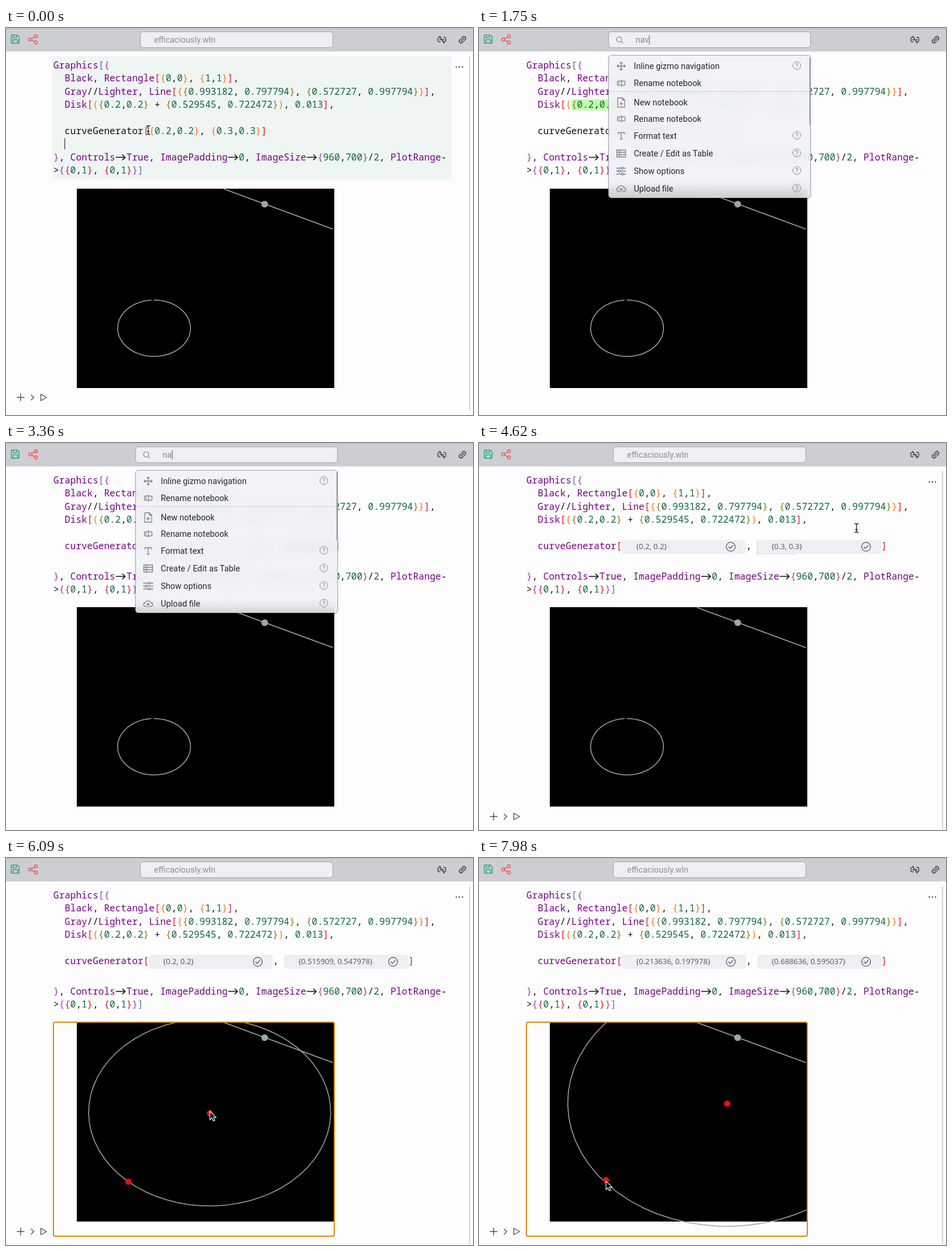
An HTML page that plays this animation: 798x660 px, repeating every 8000 ms.

```html
<!DOCTYPE html>
<html lang="en">
<head>
<meta charset="utf-8">
<title>Notebook curve editor</title>
<style>
html, body { margin: 0; width: 100%; height: 100%; overflow: hidden; background: #fdfdfd; }
svg { position: absolute; left: 0; top: 0; display: block; }
text { white-space: pre; }
.code { font: 16px "Noto Sans Mono", "DejaVu Sans Mono", monospace; }
.ui { font: 14.3px Roboto, "Liberation Sans", sans-serif; }
.field { font: 13px "Open Sans", "Noto Sans", sans-serif; fill: #55565c; }
.line { fill: none; stroke-linecap: round; stroke-linejoin: round; }
#menu {
  position: absolute; left: 221px; top: 46px; width: 344px; height: 242px;
  border: 1px solid #a3a5ad; border-radius: 5px; overflow: hidden;
  background: rgba(240, 241, 246, .86);
  -webkit-backdrop-filter: blur(9px); backdrop-filter: blur(9px);
  box-shadow: 0 1px 3px rgba(0, 0, 0, .18);
}
</style>
</head>
<body>
<svg id="stage" width="798" height="660" viewBox="0 0 798 660"></svg>
<div id="menu"><svg id="items" width="344" height="242" viewBox="222 47 344 242"></svg></div>
<script>
const LOOP = 8000, STEP = 70;
const CELL = 9.6, LEFT = 81, FIELD_W = 212;
const W = 440, H = 340;
const OPEN = [940, 2940], INSERT = [1820, 3500], CLOSE = [1820, 3710];
const GRAB = 5390, DROP = 7000, REGRAB = 7560;
const BRACKETS = ['#5f6f8a', '#a03cb4', '#d8173f', '#f57a0a', '#8a7a10'];

const stage = document.getElementById('stage');
const items = document.getElementById('items');
const menu = document.getElementById('menu');

function add(parent, tag, attrs = {}, text) {
  const el = document.createElementNS('http://www.w3.org/2000/svg', tag);
  for (const k in attrs) el.setAttribute(k, attrs[k]);
  if (text !== undefined) el.textContent = text;
  parent.appendChild(el);
  return el;
}
const group = (parent, x = 0, y = 0) => add(parent, 'g', { transform: `translate(${x} ${y})` });
const move = (el, x, y) => el.setAttribute('transform', `translate(${x} ${y})`);
const show = (el, on) => { el.style.display = on ? '' : 'none'; };
const box = (parent, x, y, width, height, fill, more) =>
  add(parent, 'rect', { x, y, width, height, fill, ...more });
const stroke = (parent, d, color, width = 1.4) =>
  add(parent, 'path', { d, class: 'line', stroke: color, 'stroke-width': width });
const ring = (cx, cy, r) => `M${cx - r} ${cy}a${r} ${r} 0 1 0 ${2 * r} 0a${r} ${r} 0 1 0 ${-2 * r} 0`;

// Header
box(stage, 0, 0, 798, 40, '#cdced3');
box(stage, 0, 0, 798, 1, '#b9bac0');
stroke(stage, 'M10.500 12h9l3 3v9.500q0 1.500-1.500 1.500h-10.500q-1.500 0-1.500-1.500v-11q0-1.500 1.500-1.500z' +
  'M12 12v4.500h6v-4.500M12 26v-6h8v6', '#35a583', 1.5);
stroke(stage, ring(41.5, 19.5, 2.6) + ring(51, 14, 2.6) + ring(51, 24.7, 2.6) +
  'M44 18l4.700-2.700M44 21l4.700 2.400', '#f0595b', 1.5);
stroke(stage, 'M743 16h-3q-2 0-2 2v3.500q0 2 2 2h2M748 16h1.500q2 0 2 2v3.500q0 2-2 2h-3' +
  'M741 20h3M746.500 20h2M741 14l8 12', '#44454a', 1.4);
const link = add(stage, 'g', { transform: 'translate(780 20) rotate(-45)' });
stroke(link, 'M-1-3h-2.500a3 3 0 0 0 0 6h2.500M1-3h2.500a3 3 0 0 1 0 6h-2.500M-3 0h6', '#44454a', 1.5);

const BAR = { rx: 5, stroke: '#a2a3aa' };
const title = group(stage);
box(title, 229.5, 6.5, 329, 27, '#eeeff3', BAR);
add(title, 'text', { x: 253, y: 25, class: 'ui', fill: '#8d8e93' }, 'efficaciously.wln');
const search = group(stage);
box(search, 221.5, 6.5, 345, 27, '#eeeff3', BAR);
stroke(search, ring(239.500, 19.500, 4.300) + 'M242.800 22.800l3 3', '#85868c', 1.2);
const query = add(search, 'text', { x: 267.500, y: 25, class: 'ui', fill: '#85868c' });
const queryCaret = box(search, 0, 12, 1, 16, '#55565c');

// Code cell
const cell = box(stage, 79, 48, 682, 210, '#eef5f3');
const selection = box(stage, 0, 165, 0, 22, '#d5d5dc');
const match = box(stage, LEFT + 8 * CELL, 121.5, 9 * CELL, 19, '#99ff77', { opacity: .62 });

function colorOf(token) {
  if (/^curve/.test(token)) return null;
  if (/[A-Za-z]/.test(token)) return '#770088';
  if (/\d/.test(token)) return '#116644';
  return '#111';
}

function buildCode(args, known, shift) {
  const g = add(stage, 'g', { class: 'code' });
  const lines = [
    'Graphics[{',
    '  Black, Rectangle[{0,0}, {1,1}],',
    '  Gray//Lighter, Line[{{0.993182, 0.797794}, {0.572727, 0.997794}}],',
    '  Disk[({0.2,0.2} + {0.529545, 0.722472}), 0.013],',
    '',
    `  curveGenerator[${args}]`,
    '',
    '}, Controls->True, ImagePadding->0, ImageSize->{960,700}/2, PlotRange-',
    '>{{0,1}, {0,1}}]'
  ];
  let depth = 0;
  lines.forEach((line, row) => {
    let x = LEFT;
    const y = 69 + 22.4 * row + (row > 5 ? shift : 0);
    for (const token of line.match(/[A-Za-z]+|[\d.]+|->|./g) || []) {
      if (token === '#') { x += FIELD_W; continue; }
      let fill = colorOf(token) || (known ? '#770088' : '#111');
      if (/[[({]/.test(token)) fill = BRACKETS[depth++ % 5];
      if (/[\])}]/.test(token)) fill = BRACKETS[--depth % 5];
      if (token === '->') stroke(g, `M${x + 1.5} ${y - 5.2}h15.500m-4.500-4.300l4.500 4.300l-4.500 4.300`, '#111', 1.5);
      else if (token !== ' ') add(g, 'text', { x, y, fill }, token);
      x += token.length * CELL;
    }
  });
  return g;
}
const codes = [
  buildCode('{0.2,0.2}, {0.3,0.3}', false, 0),
  buildCode('#, {0.3,0.3}', true, 7),
  buildCode('#, #', true, 7)
];

function buildField(x) {
  const g = group(stage, x);
  const edge = group(g);
  box(g, 0, 165, FIELD_W, 24, '#eeeff4', { rx: 4 });
  const label = add(g, 'text', { x: 24, y: 181, class: 'field' });
  stroke(g, ring(186, 177, 7.6) + 'M182.500 177.200l2.500 2.500l4.600-5', '#5b5c63', 1.3);
  return { g, edge, label };
}
const fields = [buildField(244.2), buildField(475.4)];
box(fields[0].edge, 0, 180, FIELD_W, 12.5, '#c9cad0');
box(fields[1].edge, -.5, 166, 68, 23.6, '#b9bac0', { rx: 2 });

const caret = box(stage, 100, 188, 1, 19, '#111');

// Cell controls
const chrome = group(stage);
for (const x of [769.5, 774.7, 780]) add(chrome, 'circle', { cx: x, cy: 66.5, r: 1.3, fill: '#55565c' });
const rail = box(chrome, 791.3, 48, 1.5, 604, '#c4c5ca');
const tools = group(chrome);
stroke(tools, 'M19 630h12M25 624v12M43 626l4.500 4l-4.500 4.500M59.500 624.500v11l10-5.500z', '#505157', 1.4);

// Plot, in pixels from its top left corner
const defs = add(stage, 'defs');
box(add(defs, 'clipPath', { id: 'clip' }), -40, 0, 480, 365, '#000');
const plot = group(stage, 121, 274);
const art = add(plot, 'g', { 'clip-path': 'url(#clip)' });
box(art, 0, 0, W, H, '#000');
const GRAY = '#a4a4a4';
const px = (u, v) => `${u * W} ${H - v * H}`;
stroke(art, `M${px(.993182, .797794)}L${px(.572727, .997794)}`, GRAY, 1.5);
add(art, 'circle', { cx: .729545 * W, cy: H - .922472 * H, r: 5.7, fill: GRAY });
const curve = stroke(art, '', GRAY, 1.5);
const dots = [0, 1].map(() => add(art, 'circle', { r: 5.3, fill: '#f60b0b' }));
const frame = box(plot, -40, 0, 480, 365, 'none', { rx: 3, stroke: '#d98a0c', 'stroke-width': 2 });

// Pointers
const beam = group(stage);
const BEAM = 'M-3-7.500q3 0 3 2q0-2 3-2M0-5.500v11M-3 7.500q3 0 3-2q0 2 3 2M-1.500 2.500h3';
stroke(beam, BEAM, '#fff', 3);
stroke(beam, BEAM, '#111', 1.3);
const arrow = group(stage);
add(arrow, 'path', {
  d: 'M0 0v14.500l3.400-3.100l2.300 5.100l2.500-1.100l-2.300-5h4.500z',
  fill: '#000', stroke: '#fff', 'stroke-width': 1.1
});

// Command menu
const ICONS = {
  move: 'M-7 0h14M0-7v14M-2-5l2-2l2 2M-2 5l2 2l2-2M-5-2l-2 2l2 2M5-2l2 2l-2 2',
  rename: 'M-1-3.500h-4q-1.500 0-1.500 1.500v4q0 1.500 1.500 1.500h4M2-3.500h3q1.500 0 1.500 1.500v4q0 1.500-1.500 1.500h-3M.500-5.500v11M-4-1v2',
  page: 'M-6-8h8l4 4v12h-12zM2-8v4h4M-2.500 2h5M0-.500v5',
  sliders: 'M-8-5h8M4-5h4M-8 0h3M-1 0h9M-8 5h8M4 5h4' + ring(2, -5, 1.8) + ring(-3, 0, 1.8) + ring(2, 5, 1.8),
  grid: [-5, 0, 5].map(y => [-5, 0, 5].map(x => `M${x - 1} ${y - 1}h2v2h-2z`).join('')).join(''),
  text: 'M-5.500-3v-2.500h11v2.500M0-5.500v11M-2 5.500h4',
  table: 'M-7.500-6h15v12h-15zM-7.500-2h15M-7.500 2h15M-3-6v12',
  upload: 'M-3 4.500h-1.500a3 3 0 0 1-.500-6a5 5 0 0 1 9.500 0a3 3 0 0 1 .500 6h-2M0 6v-6M-2 1.500l2-2l2 2'
};
const COMMANDS = {
  gizmo: ['Inline gizmo navigation', 'move', 1],
  rename: ['Rename notebook', 'rename'],
  create: ['New notebook', 'page'],
  options: ['Show options', 'sliders', 1],
  matrix: ['Insert matrix', 'grid', 1],
  format: ['Format text', 'text', 1],
  table: ['Create / Edit as Table', 'table', 1],
  upload: ['Upload file', 'upload', 1]
};

function buildList(rows, divider) {
  const g = add(items, 'g');
  box(g, 222, divider, 344, 1, '#d3d4da');
  for (const [key, y] of rows) {
    const [name, icon, help] = COMMANDS[key];
    stroke(group(g, 243, y), ICONS[icon], '#808187', 1.3);
    add(g, 'text', { x: 264.5, y: y + 5, class: 'ui', fill: '#26272b' }, name);
    if (!help) continue;
    stroke(g, ring(543, y - 1, 6.7), '#8a8b91', 1);
    add(g, 'text', { x: 543, y: y + 2.6, class: 'ui', fill: '#7a7b81', 'text-anchor': 'middle',
      style: 'font-size:10px' }, '?');
  }
  return g;
}
const lists = [
  buildList([['gizmo', 65], ['rename', 94], ['create', 122], ['options', 151], ['matrix', 181],
    ['create', 215], ['rename', 243], ['format', 272]], 196),
  buildList([['gizmo', 65], ['rename', 94], ['create', 127], ['rename', 155], ['format', 184],
    ['table', 214], ['options', 244], ['upload', 274]], 108)
];
box(items, 564.7, 50, 1.3, 116, '#8d929e');

// Motion: keys are [time, x, y]
function follow(keys, t) {
  if (t <= keys[0][0]) return keys[0].slice(1);
  for (let i = 1; i < keys.length; i++) {
    const [t0, x0, y0] = keys[i - 1], [t1, x1, y1] = keys[i];
    if (t > t1) continue;
    const k = (t - t0) / (t1 - t0), e = k * k * (3 - 2 * k);
    return [x0 + (x1 - x0) * e, y0 + (y1 - y0) * e];
  }
  return keys[keys.length - 1].slice(1);
}
const POINTER = [[140, 243, 174], [700, 331, 175], [1820, 331, 176], [2380, 475, 174], [2520, 475, 174],
  [2830, 562, 175], [3710, 562, 175], [4480, 645, 145], [4620, 645, 145], [5250, 253, 518],
  [7070, 424, 419], [7490, 209, 552]];
const RIM = [[REGRAB, 88, 68], [7910, 94, 67.3125], [7980, 96, 71]];
const CENTER = [[GRAB, 132, 102], [6020, 227, 186.3125], [6090, 227.5, 186], [DROP, 303, 202.3125]];

const inside = (t, a, b) => t >= a && t < b;
const snap = ([x, y], moving) => moving ? [Math.round(x), Math.round(y - .3125) + .3125] : [x, y];
const label = ([x, y]) => `{${+(x / W).toFixed(6)}, ${+(y / H).toFixed(6)}}`;

function curvePath([ax, ay], [cx, cy]) {
  const r = Math.hypot((ax - cx) / W, (ay - cy) / H);
  let d = '';
  for (let i = 0; i <= 62; i++) {
    const a = i / 10;
    d += `${i ? 'L' : 'M'}${(cx + r * W * Math.sin(a)).toFixed(2)} ${(H - cy - r * H * Math.cos(a)).toFixed(2)}`;
  }
  return d;
}

function typed(t) {
  const starts = t < 2000 ? [1120, 1400, 1610] : [3150, 3290, 3430];
  return 'nav'.slice(0, starts.filter(s => t >= s).length);
}

function drawPointer(t, top) {
  let [x, y] = follow(POINTER, t);
  if (inside(t, GRAB, DROP + 70)) {
    const [u, v] = follow(CENTER, t);
    [x, y] = [121 + u, top + H - v - 2];
  } else if (t >= REGRAB) {
    const [u, v] = follow(RIM, t);
    [x, y] = [121 + u, top + H - v + 2];
  }
  const hidden = inside(t, OPEN[0], INSERT[0]) || inside(t, OPEN[1], CLOSE[1]);
  const overText = y < 262;
  show(beam, !hidden && overText);
  show(arrow, !hidden && !overText);
  move(beam, x, y);
  move(arrow, x, y);
}

function draw(t) {
  const phase = INSERT.filter(s => t >= s).length;
  const top = phase ? 280 : 274;
  const listOpen = OPEN.some((s, i) => inside(t, s, INSERT[i]));
  const searching = OPEN.some((s, i) => inside(t, s, CLOSE[i]));
  const focused = t < OPEN[0] || inside(t, 2520, OPEN[1]);

  show(title, !searching);
  show(search, searching);
  menu.style.display = listOpen ? '' : 'none';
  const word = typed(t);
  query.textContent = word;
  if (searching) queryCaret.setAttribute('x', 268 + (word ? query.getComputedTextLength() : 0));
  show(lists[0], word.length < 2);
  show(lists[1], word.length > 1);

  show(cell, focused);
  cell.setAttribute('height', phase ? 217 : 210);
  codes.forEach((g, i) => show(g, i === phase));
  fields.forEach((f, i) => show(f.g, phase > i));
  show(fields[0].edge, t < 3710);
  show(fields[1].edge, t < 4900);
  show(caret, t < 140);

  const from = phase ? 475.4 : 244.2;
  const selecting = inside(t, 140, INSERT[0]) || inside(t, 2520, INSERT[1]);
  const span = Math.min(9 * CELL, Math.max(0, follow(POINTER, t)[0] - from));
  show(selection, selecting);
  selection.setAttribute('x', from);
  selection.setAttribute('width', Math.round(span / CELL) * CELL);
  show(match, inside(t, 700, INSERT[0]));

  show(chrome, !listOpen);
  rail.setAttribute('height', phase ? 611 : 604);
  move(tools, 0, phase ? 7 : 0);

  // The curve and the fields trail the handles by one step
  const late = t - STEP;
  const rim = snap(follow(RIM, late), late > REGRAB);
  const center = snap(follow(CENTER, late), late > GRAB);
  move(plot, 121, top);
  curve.setAttribute('d', curvePath(rim, center));
  fields[0].label.textContent = label(rim);
  fields[1].label.textContent = label(center);
  [follow(RIM, t), follow(CENTER, t)].forEach(([x, y], i) => {
    show(dots[i], t >= 5040);
    dots[i].setAttribute('cx', x);
    dots[i].setAttribute('cy', H - y + (i && t > GRAB ? 1.2 : 0));
  });
  show(frame, t >= GRAB);
  drawPointer(t, top);
}

const start = performance.now();
function tick() {
  const t = (performance.now() - start) % LOOP;
  draw(Math.floor(t / STEP) * STEP);
  requestAnimationFrame(tick);
}
tick();
</script>
</body>
</html>
```
